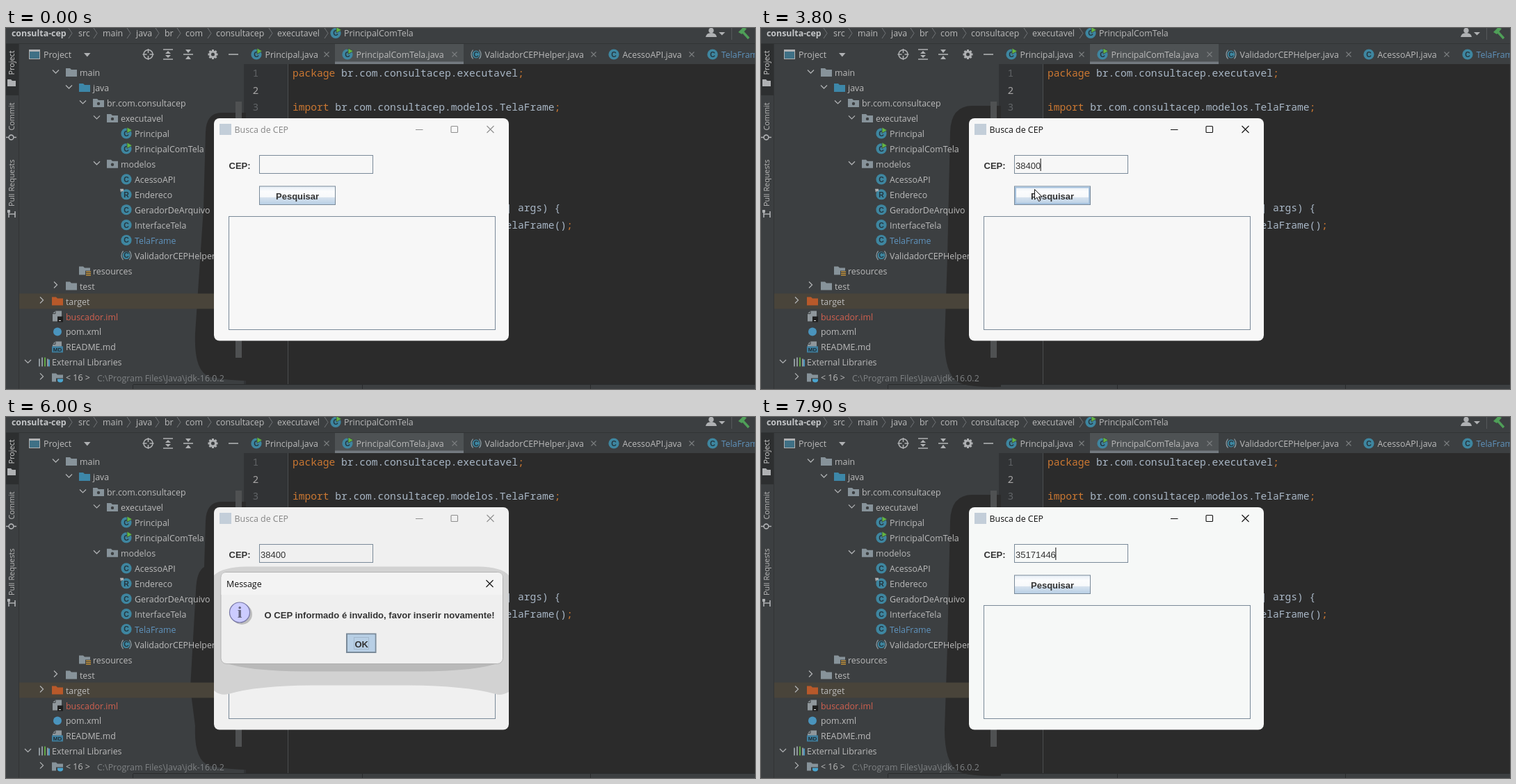
An HTML page for the animation above (8000 ms loop, 1077 by 520 pixels).

```html
<!DOCTYPE html>
<html lang="pt">
<head>
<meta charset="utf-8">
<title>Busca de CEP</title>
<style>
html, body { margin: 0; width: 100%; height: 100%; overflow: hidden; background: #2b2b2b; }
svg { display: block; width: 1077px; height: 520px; }
text { white-space: pre; }
.ui { font: 12.4px "Open Sans", "Noto Sans", sans-serif; }
.code { font: 14.6px "Noto Sans Mono", "DejaVu Sans Mono", monospace; }
.java { font: 13px "Liberation Sans", Arial, sans-serif; }
.bold { font-weight: 700; }
</style>
</head>
<body>
<svg id="stage" viewBox="0 0 1077 520"></svg>
<script>
const TEXT = '#bbbbbb', BLUE = '#5f93bd', EDGE = '#7a8a99', ICON = '#afb1b3';

const rect = (x, y, w, h, fill, more = '') =>
  `<rect x="${x}" y="${y}" width="${w}" height="${h}" fill="${fill}" ${more}/>`;
const line = (d, stroke, width = 1, more = '') =>
  `<path d="${d}" fill="none" stroke="${stroke}" stroke-width="${width}" ${more}/>`;
const shape = (d, fill, more = '') => `<path d="${d}" fill="${fill}" ${more}/>`;
const disc = (x, y, r, fill, more = '') => `<circle cx="${x}" cy="${y}" r="${r}" fill="${fill}" ${more}/>`;
const esc = s => s.replace(/&/g, '&amp;').replace(/</g, '&lt;');
const label = (x, y, s, fill = TEXT, cls = 'ui', more = '') =>
  `<text x="${x}" y="${y}" fill="${fill}" class="${cls}" ${more}>${esc(s)}</text>`;
const group = (id, body) => `<g id="${id}">${body}</g>`;
const cross = (x, y, r, stroke, width = 1) =>
  line(`M${x - r},${y - r}l${2 * r},${2 * r}m0,${-2 * r}l${-2 * r},${2 * r}`, stroke, width);

const chevron = (x, y, open) =>
  line(open ? `M${x - 4.5},${y - 3}l4.5,4.5 4.5,-4.5` : `M${x - 2.5},${y - 5.5}l4.5,4.5 -4.5,4.5`, ICON, 1.3);

function folder(x, y, fill, dot) {
  return shape(`M${x - 8},${y - 6}h6l2,2h8v10h-16z`, fill) + (dot ? disc(x, y + 1, 2.2, '#3c3f41') : '');
}

function classIcon(x, y, kind = '', letter = 'C') {
  const run = kind === 'run' ? shape(`M${x + 1},${y - 9}l7.5,4.3 -7.5,4.3z`, '#62b543', 'stroke="#3c3f41" stroke-width=".8"') : '';
  const pin = kind === 'pin' ? shape(`M${x - 9},${y - 8}h5v4l-2,-1 -2,2z`, ICON) : '';
  const braces = kind === 'braces'
    ? line(`M${x - 4.5},${y - 6.5}q-5,6.5 0,13M${x + 4.5},${y - 6.5}q5,6.5 0,13`, '#8fa0a8', 1.2) : '';
  return disc(x, y, kind === 'braces' ? 5.4 : 7.6, '#3e86a0') +
    label(x, y + 3.8, letter, '#24343c', 'java bold', 'text-anchor="middle" style="font-size:10.5px"') +
    run + pin + braces;
}

function sheet(x, y, tag) {
  return shape(`M${x - 3},${y - 8}h9v15h-13v-11z`, '#8f979c') +
    line(`M${x - 3},${y - 8}v4h-4`, '#3c3f41') + tag;
}

const icons = {
  gray: (x, y) => folder(x, y, '#87939a'),
  blue: (x, y) => folder(x, y, '#3d87a8'),
  pack: (x, y) => folder(x, y, '#87939a', true),
  orange: (x, y) => folder(x, y, '#b8592a'),
  res: (x, y) => folder(x, y, '#87939a') + rect(x + 1, y, 8, 8, '#3c3f41') +
    line(`M${x + 2},${y + 1.5}h7m-7,2.5h7m-7,2.5h7`, '#d09a3a', 1.3),
  run: (x, y) => classIcon(x, y, 'run'),
  cls: (x, y) => classIcon(x, y),
  rec: (x, y) => classIcon(x, y, 'pin', 'R'),
  abs: (x, y) => classIcon(x, y, 'braces'),
  iml: (x, y) => sheet(x, y, rect(x, y, 8, 8, '#1e1e1e') + line(`M${x + 2},${y + 6}h3`, '#ddd')),
  dot: (x, y) => disc(x, y, 6, '#4a94bd'),
  md: (x, y) => sheet(x, y, rect(x - 8, y - 1, 16, 9, '#3f7f9f') +
    label(x, y + 6.2, 'MD', '#1f2b32', 'java bold', 'text-anchor="middle" style="font-size:8px"')),
  libs: (x, y) => line(`M${x - 6},${y - 5}v11m4,-13v13m8,-11v11`, '#8f979c', 2) +
    line(`M${x + 2},${y - 7}v13`, '#62a543', 2) + line(`M${x + 8},${y - 4}v10`, '#4a94bd', 2),
  jdk: (x, y) => folder(x, y, '#87939a') + rect(x - 2, y + 1, 11, 7, '#3c3f41') +
    shape(`M${x},${y + 2}h8v2q0,3 -4,3t-4,-3z`, '#4aa5cf')
};

// icon x, icon, name, open state, colour
const tree = [
  [94, 'gray', 'main', 1], [113, 'blue', 'java', 1], [133, 'pack', 'br.com.consultacep', 1],
  [153, 'pack', 'executavel', 1], [173, 'run', 'Principal'], [173, 'run', 'PrincipalComTela'],
  [153, 'pack', 'modelos', 1], [173, 'cls', 'AcessoAPI'], [173, 'rec', 'Endereco'],
  [173, 'cls', 'GeradorDeArquivo'], [173, 'cls', 'InterfaceTela'], [173, 'cls', 'TelaFrame', , BLUE],
  [173, 'abs', 'ValidadorCEPHelper'], [113, 'res', 'resources'], [94, 'gray', 'test', 0],
  [74, 'orange', 'target', 0], [74, 'iml', 'buscador.iml', , '#d1604f'], [74, 'dot', 'pom.xml'],
  [74, 'md', 'README.md'], [54, 'libs', 'External Libraries', 1], [74, 'jdk', '< 16 >', 0]
];

function treeRows() {
  return tree.map(([x, icon, name, open, fill], i) => {
    const y = 64.5 + i * 21.97;
    return (open === undefined ? '' : chevron(x - 22.5, y - 1, open)) +
      icons[icon](x, y - .5) + label(x + 12, y + 4.5, name, fill);
  }).join('') + label(131, 508.5, 'C:\\Program Files\\Java\\jdk-16.0.2', '#7f8284');
}

function breadcrumb() {
  const parts = [[104, 'src'], [139, 'main'], [187, 'java'], [228, 'br'], [258, 'com'],
    [302, 'consultacep'], [390, 'executavel'], [486, 'PrincipalComTela']];
  const gaps = [93, 129, 177, 218, 249, 293, 381, 461];
  return rect(0, 0, 1077, 22, '#3c3f41') + label(8, 12, 'consulta-cep', '#c4c6c8', 'ui bold') +
    parts.map(([x, s]) => label(x, 12, s)).join('') +
    gaps.map(x => line(`M${x - 3},0l5,7.5 -5,7.5`, '#717477')).join('') +
    classIcon(474, 7.5, 'run') +
    disc(1014, 3.5, 3.7, ICON) + shape('M1006,13q1,-6 8,-6t8,6z', ICON) +
    shape('M1025,6h9l-4.5,4.5z', ICON) + line('M1043.5,0v17', '#55585a') +
    line('M1058,4l10,11', '#4f9f58', 3.4) + shape('M1053,6l7,-7 5,2 -7,8z', '#4f9f58');
}

function tabs() {
  const list = [[360, 'run', 'Principal.java', 461], [491, 'run', 'PrincipalComTela.java', 645],
    [676, 'abs', 'ValidadorCEPHelper.java', 845], [874, 'cls', 'AcessoAPI.java', 986],
    [1016, 'cls', 'TelaFrame.java', 1110]];
  return rect(342, 23, 735, 29, '#3c3f41') + rect(473, 23, 185, 29, '#4e5254') + rect(473, 48.5, 185, 3.5, '#747a80') +
    list.map(([x, icon, s, end], i) => icons[icon](x, 38) +
      label(x + 12.5, 43, s, i === 4 ? BLUE : TEXT) + cross(end, 38, 3.5, '#7c7f81', 1.1)).join('');
}

function sideBar() {
  const turned = (y, s, fill) => label(0, 0, s, fill, 'ui', `style="font-size:10.8px" transform="translate(12,${y}) rotate(-90)"`);
  return rect(0, 23, 18, 497, '#3c3f41') + rect(0, 23, 18, 74, '#2d2f30') + line('M18.5,23V520', '#323435') +
    turned(67.5, 'Project', '#d0d0d0') + turned(147.5, 'Commit', TEXT) + turned(257, 'Pull Requests', TEXT) +
    shape('M2,74h5l2,2h5v8h-12z', ICON) +
    line('M0,157.5h4m7,0h4', ICON, 1.6) + disc(7.5, 157.5, 3.4, 'none', `stroke="${ICON}" stroke-width="1.6"`) +
    line('M4,263v10M4,268h9v-4m0,4v5', ICON, 1.6) + rect(2, 262, 4, 4, ICON);
}

function panelHead() {
  let gear = disc(297.5, 38, 4, 'none', `stroke="${ICON}" stroke-width="3"`);
  for (let a = 0; a < 360; a += 45) gear += rect(296, 31, 3, 3, ICON, `transform="rotate(${a} 297.5 38)"`);
  return rect(19, 23, 323, 29, '#3c3f41') +
    rect(33.5, 31.5, 15, 13, '#3f7085', `stroke="${ICON}"`) + rect(34, 31, 15, 3, ICON) +
    label(54, 43, 'Project') + shape('M112,36h9.5l-4.7,5.5z', ICON) +
    disc(204.5, 38, 6.5, 'none', `stroke="${ICON}" stroke-width="1.5"`) +
    line('M204.5,30v6m0,4v6m-8,-8h6m4,0h6', ICON, 1.5) +
    line('M226,31h14M226,45h14', ICON, 1.6) + shape('M229,37l4,-4 4,4zm0,2l4,4 4,-4z', ICON) +
    line('M255,38h14', ICON, 1.6) + shape('M258,31l4,5 4,-5zm0,14l4,-5 4,5z', ICON) +
    gear + line('M320,38h14', ICON, 1.6);
}

function editor() {
  const key = s => `<tspan fill="#cc7832">${s}</tspan>`;
  const row = (n, body) => `<text x="412" y="${70.3 + (n - 1) * 24.25}" fill="#a9b7c6" class="code">${body}</text>`;
  const num = (n, fill) => label(354.5, 70.3 + (n - 1) * 24.25, String(n), fill, 'code');
  return rect(342, 52, 735, 468, '#2b2b2b') + rect(342, 52, 63, 461, '#313335') + line('M405.5,52V513', '#4b4d4f') +
    num(1, '#606366') + num(2, '#a4a3a3') + num(3, '#606366') +
    row(1, key('package ') + 'br.com.consultacep.executavel' + key(';')) +
    row(3, key('import ') + 'br.com.consultacep.modelos.TelaFrame' + key(';')) +
    row(9, '    ' + key('public static void ') + 'main(String[] args) {') +
    row(10, '        TelaFrame telaFrame = ' + key('new ') + 'TelaFrame()' + key(';'));
}

function mainWindow() {
  return rect(299, 130, 424, 320.5, '#f7f7f7', 'id="face" rx="8"') +
    rect(307, 138, 17, 16, '#c3ced9') + label(328.5, 151, 'Busca de CEP', '#000', 'ui', 'id="title"') +
    group('caption', line('M589,146.5h10.5', 'currentColor') +
      rect(640, 141.5, 9.5, 9, 'none', 'rx="1" stroke="currentColor" stroke-width="1.1"') + cross(696.5, 146, 5, 'currentColor', 1.1)) +
    label(320.5, 203, 'CEP:', '#333', 'java bold') +
    rect(364.5, 183.5, 163, 26, 'none', `stroke="${EDGE}"`) +
    rect(366, 188, 36, 18, '#b8cfe5', 'id="mark"') + label(366, 203, '', '#333', 'java', 'id="entry"') +
    rect(366, 188, 1.2, 18, '#333', 'id="caret"') +
    rect(364.5, 228, 109, 26.5, 'url(#metal)', `id="search" stroke="${EDGE}"`) +
    rect(366, 229.5, 106, 23.5, 'none', 'id="glow" stroke="#a6c2de" stroke-width="2"') +
    label(388, 247, 'Pesquisar', '#333', 'java bold') +
    rect(387.5, 231.5, 64, 18, 'none', 'id="focus" stroke="#a3b8cc"') +
    rect(320.5, 271.5, 383, 163, 'none', `stroke="${EDGE}"`);
}

function dialogShadow() {
  return shape('M299,228Q312,216 345,215.5H680Q712,216 723,228V396Q712,402 704,399Q660,387 580,386.5H440Q360,387 320,399Q308,402 299,394Z', '#d2d2d2') +
    shape('M312,345V353Q345,366 430,366.5H595Q680,366 712,353V345Z', '#b9b9b9');
}

function dialogBox() {
  return rect(309, 223.5, 405.5, 132, '#efefef', 'rx="8" stroke="#a8a8a8" stroke-width=".8"') +
    shape('M309.5,256V231q0,-7 7.5,-7H706.5q7.5,0 7.5,7V256z', '#f3f3f3') +
    label(317, 245, 'Message', '#111') + cross(695.5, 240, 5, '#111', 1.1) +
    disc(339, 284, 15, '#bdbdbd') + disc(336, 281.5, 14.5, '#ccccff', 'stroke="#7676a6" stroke-width="1.2"') +
    label(336, 289, 'i', '#666680', 'bold', 'text-anchor="middle" style="font-family:\'Liberation Serif\',serif;font-size:24px"') +
    label(371.5, 290, 'O CEP informado é invalido, favor inserir novamente!', '#333', 'java bold', 'style="font-size:13.06px"') +
    rect(490, 312.5, 41.5, 26.5, 'url(#metal)', `id="ok" stroke="${EDGE}" stroke-width="2"`) +
    rect(492, 314.5, 37.5, 22.5, 'none', 'stroke="#b8cfe5" stroke-width="2"') +
    rect(500.5, 317.5, 21, 17, 'none', 'stroke="#a3b8cc"') + label(501.5, 331.5, 'OK', '#333', 'java bold');
}

document.getElementById('stage').innerHTML =
  `<defs><linearGradient id="metal" x2="0" y2="1">
    <stop stop-color="#e6eef6"/><stop offset=".28" stop-color="#fbfcfd"/><stop offset=".58" stop-color="#f7f9fb"/>
    <stop offset=".62" stop-color="#d6e2ee"/><stop offset="1" stop-color="#b8cfe5"/></linearGradient></defs>` +
  rect(0, 0, 1077, 520, '#323435') + rect(19, 52, 323, 468, '#3c3f41') + editor() +
  rect(19, 513, 1058, 7, '#3c3f41') + line('M183,513.5H1077M182.5,514v6M512.5,514v6M840.5,514v6', '#292b2c') +
  shape('', '#2b2b2b', 'id="shade"') + rect(19, 382.5, 323, 22, '#49443a') + rect(330, 106, 9, 369, '#4f5152') +
  treeRows() + panelHead() + tabs() + sideBar() + breadcrumb() + mainWindow() +
  group('dim', dialogShadow()) + group('dialog', dialogBox()) +
  shape('M0,0V14.5L3.4,11.5 5.8,17 8.3,16 5.9,10.7H10.7Z', '#fff', 'id="pointer" stroke="#111" stroke-width="1" stroke-linejoin="round"');

const $ = {};
document.querySelectorAll('[id]').forEach(e => $[e.id] = e);
const set = (e, name, value) => e.setAttribute(name, value);
const show = (e, on) => set(e, 'visibility', on ? 'visible' : 'hidden');

const shades = {
  active: 'M345,112H304Q273,112 272,150L268,330 264,450Q264,500 285,511Q300,518 345,517V513H405V451H345Z',
  idle: 'M345,122H310Q288,122 287,150L284,260 272,440Q270,494 292,502Q310,507 345,508V513H405V451H345Z',
  modal: 'M345,122H310Q288,122 287,150L285,216Q274,222 273,250L265,390 272,445Q270,494 292,502Q310,507 345,508V513H405V451H345Z'
};

// pointer runs: each is a list of [ms, x, y], shown until its end time
const runs = [
  { end: 900, at: [[300, 714, 0], [400, 690, 110], [500, 620, 220], [600, 530, 262], [700, 450, 250], [800, 405, 214]] },
  { end: 5800, at: [[3200, 390, 212], [3400, 388, 224], [3500, 388, 224], [3600, 393, 232], [4400, 393, 232],
    [4700, 481, 294], [4800, 481, 294], [5000, 364, 264], [5400, 627, 290], [5600, 545, 333], [5700, 516, 317]] }
];

function pointerAt(t) {
  const run = runs.find(r => t >= r.at[0][0] && t < r.end);
  if (!run) return null;
  const i = run.at.findIndex(p => p[0] > t);
  if (i < 0) return run.at[run.at.length - 1].slice(1);
  const a = run.at[i - 1], b = run.at[i], k = (t - a[0]) / (b[0] - a[0]);
  return [a[1] + (b[1] - a[1]) * k, a[2] + (b[2] - a[2]) * k];
}

const keys = [1900, 2100, 2300, 2600, 2800];
function entryAt(t) {
  if (t >= 7900) return '35171446';
  return '38400'.slice(0, keys.filter(k => t >= k).length);
}

function caretAt(t) {
  const within = (a, b) => t >= a && t < b;
  return within(1100, 1700) || within(1900, 3300) || within(3800, 3900) || within(6700, 7500) || t >= 7900;
}

function draw(ms) {
  const t = Math.floor(ms / 100) * 100;
  const modal = t >= 4000 && t < 6300, fading = t === 6200;
  const active = (t >= 1100 && t < 4000) || t >= 6200;
  const entry = entryAt(t);

  set($.shade, 'd', shades[active ? 'active' : t >= 4200 ? 'modal' : 'idle']);
  set($.face, 'fill', t < 4000 ? '#f7f7f7' : t < 6200 ? '#f0f0f0' : '#f6f8f7');
  set($.title, 'fill', active ? '#111' : '#858585');
  $.caption.style.color = active ? '#111' : '#8f8f8f';

  $.entry.textContent = entry;
  set($.caret, 'x', 366 + entry.length * 7.23 - (entry ? .6 : 0));
  show($.caret, caretAt(t));
  show($.mark, t >= 7000 && t < 7900);
  set($.search, 'fill', t === 3900 ? '#b8cfe5' : 'url(#metal)');
  show($.glow, t >= 3600 && t < 3900);
  show($.focus, t >= 3900 && t < 6700);

  const scale = t === 4000 ? .93 : t === 4100 ? .984 : fading ? .95 : 1;
  show($.dialog, modal);
  show($.dim, modal);
  set($.dialog, 'opacity', t === 4000 ? .6 : fading ? .4 : 1);
  set($.dim, 'opacity', t === 4000 ? .5 : fading ? .3 : 1);
  set($.dialog, 'transform', `translate(436 240) scale(${scale}) translate(-436 -240)`);
  set($.ok, 'fill', t >= 6000 ? '#b8cfe5' : 'url(#metal)');

  const p = pointerAt(t);
  show($.pointer, p);
  if (p) set($.pointer, 'transform', `translate(${p[0] + .5} ${p[1] + .5})`);
}

function tick() {
  draw(performance.now() % 8000);
  requestAnimationFrame(tick);
}
tick();
</script>
</body>
</html>
```
